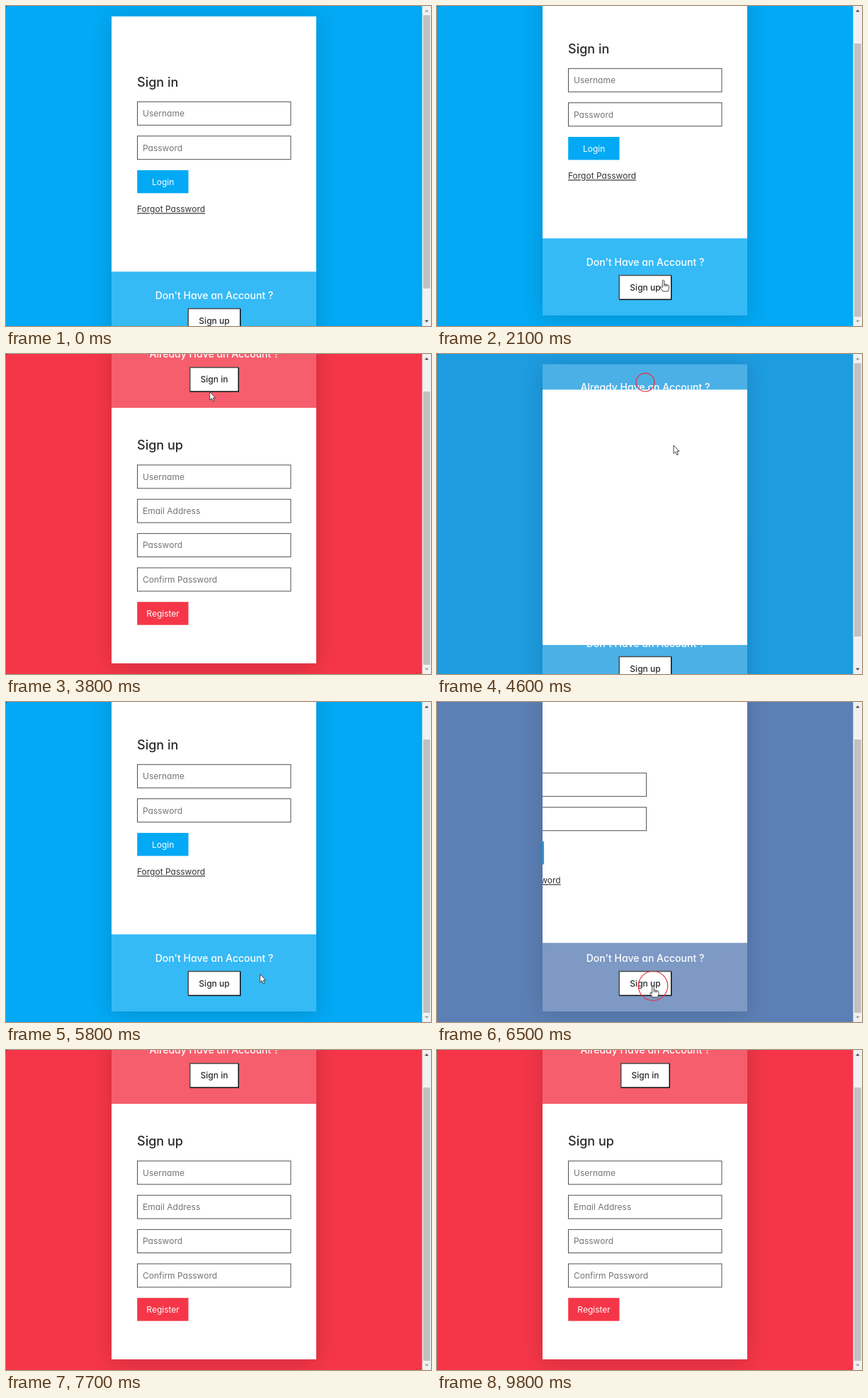
Animation of 600 by 452 pixels, one loop 9.9 s. Source, as an HTML page:

```html
<!DOCTYPE html>
<html lang="en">
<head>
<meta charset="utf-8">
<title>Sign in and sign up</title>
<style>
  html, body { margin: 0; width: 100%; height: 100%; overflow: hidden; }
  #stage { display: block; width: 600px; height: 452px; }
  text { font: 400 12px Inter, "Open Sans", sans-serif; font-feature-settings: "cv11"; fill: #333; }
  .title { font-size: 18px; font-weight: 500; fill: #2b2b2f; }
  .hint { fill: #757575; }
  .ask { font-size: 14px; font-weight: 500; fill: #fff; text-anchor: middle; }
  .label { font-weight: 500; text-anchor: middle; fill: #2b2b2f; }
  .action { fill: #fff; text-anchor: middle; }
  .link { text-decoration: underline; }
  .field { fill: none; stroke: #505055; }
  .edge { fill: none; stroke-width: 1.5; }
</style>
</head>
<body>
<svg id="stage" viewBox="0 0 600 452">
  <defs>
    <filter id="soft" x="-30%" y="-20%" width="160%" height="140%">
      <feGaussianBlur stdDeviation="16.2"/>
    </filter>
    <clipPath id="outside">
      <path clip-rule="evenodd" d="M0-60H588V560H0ZM149 14.5V484.1H438V14.5Z"/>
    </clipPath>
  </defs>
  <rect id="back" width="600" height="452"/>
  <g id="page">
    <g clip-path="url(#outside)">
      <rect x="149" y="18.1" width="289" height="469.6" opacity=".15" filter="url(#soft)"/>
    </g>
    <rect x="149" y="14.5" width="289" height="469.6" fill="#fff" opacity=".2"/>
    <g id="panels"></g>
    <svg id="box" x="149" width="289" height="361" overflow="hidden">
      <rect width="289" height="361" fill="#fff"/>
      <g id="signin"></g>
      <g id="signup"></g>
    </svg>
  </g>
  <path d="M0 0H3Q0 0 0 3Z" opacity=".45"/>
  <rect x="587.5" width="12.5" height="452" fill="#f1f1f1"/>
  <rect id="thumb" x="589" width="9.7" height="386" fill="#c1c1c1"/>
  <path id="up" d="M591 8.2L593.9 5L596.8 8.2Z"/>
  <path id="down" d="M591 443.8L593.9 447L596.8 443.8Z"/>
  <circle id="ring" fill="none" stroke="#e8303f" stroke-width="1.2"/>
  <g id="cursor" fill="#fff" stroke="#333" stroke-width=".9" stroke-linejoin="round">
    <path id="arrow" d="M0 0V11.6L2.7 9.1L4.7 13.6L6.5 12.8L4.6 8.4H8Z"/>
    <path id="hand" d="M-1.3 1Q0-.8 1.3 1V6L3.4 6.2L5.4 6.7L7.4 7.6Q8 8 8 9V12Q7.4 14 6.6 16H-.8Q-2 13.5-4 11.2Q-4.6 9.6-3 9.4L-1.3 10.6ZM1.3 6V9M3.4 6.4V9.2M5.4 7V9.4"/>
  </g>
</svg>
<script>
const LOOP = 9900, WIDTH = 289, DROP = 108.4, TOP = 14.5, SCROLL = 47;
const BLUE = [3, 169, 244], RED = [244, 54, 72];
const $ = id => document.getElementById(id);

// Each click switches to sign up (on) or back to sign in.
const clicks = [
  { t: 2480, x: 305, y: 396, on: true },
  { t: 4300, x: 294, y: 40, on: false },
  { t: 6385, x: 305, y: 401, on: true }
];
const scrolls = [
  { t: 1820, to: SCROLL },
  { t: 4400, to: 0 },
  { t: 5050, to: SCROLL }
];
// time, x, y of the pointer
const path = [
  [200, 155, 2], [900, 245, 135], [1050, 245, 135], [1650, 318, 432], [1800, 318, 432],
  [2100, 319.5, 387], [2450, 305, 396], [2900, 305, 396], [3800, 287.7, 53.5],
  [4200, 294, 40], [4350, 294, 40], [4600, 334, 129], [4900, 334, 129],
  [5800, 358.7, 384.5], [6300, 305, 401], [6800, 305, 401]
];

const clamp = v => Math.min(1, Math.max(0, v));
const mix = (a, b, p) => a + (b - a) * p;
const smooth = p => p * p * (3 - 2 * p);

function bezier(x1, y1, x2, y2) {
  const at = (a, b, u) => 3 * a * u * (1 - u) ** 2 + 3 * b * u * u * (1 - u) + u ** 3;
  return x => {
    if (x <= 0 || x >= 1) return clamp(x);
    let lo = 0, hi = 1;
    for (let i = 0; i < 24; i++) {
      const mid = (lo + hi) / 2;
      if (at(x1, x2, mid) < x) lo = mid; else hi = mid;
    }
    return at(y1, y2, lo);
  };
}
const ease = bezier(.25, .1, .25, 1);
const easeInOut = bezier(.42, 0, .58, 1);

const text = (cls, x, y, s) => `<text class="${cls}" x="${x}" y="${y}">${s}</text>`;

function panel(question, label, mid, w) {
  const l = 294 - w / 2, r = l + w, t = mid - 3, b = t + 34;
  return text("ask", 294, mid - 17, question) +
    `<rect x="${l}" y="${t}" width="${w}" height="34" fill="#fff"/>` +
    `<path class="edge" stroke="#4c4c4c" d="M${l} ${b}V${t}H${r}"/>` +
    `<path class="edge" stroke="#111" d="M${r} ${t}V${b}H${l}"/>` +
    text("label", 294, mid + 18.3, label);
}

function form(title, base, hints, action, color) {
  const row = i => base + 21.3 + 48.4 * i;
  const end = row(hints.length);
  return text("title", 36, base, title) +
    hints.map((s, i) =>
      `<rect class="field" x="36.5" y="${row(i)}" width="216.5" height="33"/>` +
      text("hint", 44, row(i) + 20.8, s)).join("") +
    `<rect x="36.2" y="${end - .2}" width="72.3" height="32.5" fill="${color}"/>` +
    text("action", 72.6, end + 20.4, action);
}

$("panels").innerHTML =
  panel("Already Have an Account ?", "Sign in", 69, 68.5) +
  panel("Don't Have an Account ?", "Sign up", 430.5, 73.5);
$("signin").innerHTML =
  form("Sign in", 99.5, ["Username", "Password"], "Login", "#03a9f4") +
  text("link", 36, 276.8, "Forgot Password");
$("signup").innerHTML =
  form("Sign up", 59.6, ["Username", "Email Address", "Password", "Confirm Password"], "Register", "#f43648");

const latest = (list, t) => list.filter(e => e.t <= t).pop();

// Share of the sign up state, 0 to 1.
function progress(t, curve, delayOn = 0, delayOff = 0) {
  const c = latest(clicks, t);
  if (!c) return 0;
  const p = curve(clamp((t - c.t - (c.on ? delayOn : delayOff)) / 500));
  return c.on ? p : 1 - p;
}

function scrollAt(t) {
  const s = latest(scrolls, t);
  return s ? mix(SCROLL - s.to, s.to, smooth(clamp((t - s.t) / 160))) : 0;
}

function pointerAt(t) {
  const i = path.findIndex(k => k[0] > t);
  if (i < 1) return null;
  const [a, b] = [path[i - 1], path[i]];
  const p = smooth((t - a[0]) / (b[0] - a[0]));
  return { x: mix(a[1], b[1], p), y: mix(a[2], b[2], p) };
}

function drawPointer(t, scroll) {
  const pos = pointerAt(t);
  $("cursor").style.display = pos ? "" : "none";
  if (!pos) return;
  const on = progress(t, easeInOut) > .5;
  const top = (on ? 66 : 427) - scroll, half = on ? 34 : 37;
  const over = Math.abs(pos.x - 294) < half && pos.y > top && pos.y < top + 34;
  $("cursor").setAttribute("transform", `translate(${pos.x} ${pos.y})`);
  $("hand").style.display = over ? "" : "none";
  $("arrow").style.display = over ? "none" : "";
}

function drawRing(t) {
  const c = latest(clicks, t);
  const r = c ? 25.6 - .042 * (t - c.t) : 0;
  $("ring").style.display = r > 0 ? "" : "none";
  if (r <= 0) return;
  $("ring").setAttribute("cx", c.x);
  $("ring").setAttribute("cy", c.y);
  $("ring").setAttribute("r", r);
}

function draw(t) {
  const tint = progress(t, ease);
  const scroll = scrollAt(t);
  $("back").setAttribute("fill", `rgb(${BLUE.map((v, i) => Math.round(mix(v, RED[i], tint)))})`);
  $("page").setAttribute("transform", `translate(0 ${-scroll})`);
  $("box").setAttribute("y", TOP + DROP * progress(t, easeInOut));
  $("signin").setAttribute("transform", `translate(${-WIDTH * progress(t, ease, 0, 250)} 0)`);
  $("signup").setAttribute("transform", `translate(${WIDTH * (1 - progress(t, ease, 250, 0))} 0)`);
  $("thumb").setAttribute("y", 13 + scroll * 40 / SCROLL);
  $("up").setAttribute("fill", scroll > 0 ? "#505050" : "#a3a3a3");
  $("down").setAttribute("fill", scroll < SCROLL ? "#505050" : "#a3a3a3");
  drawRing(t);
  drawPointer(t, scroll);
}

const start = performance.now();
function tick() {
  draw((performance.now() - start) % LOOP);
  requestAnimationFrame(tick);
}
tick();
</script>
</body>
</html>
```
